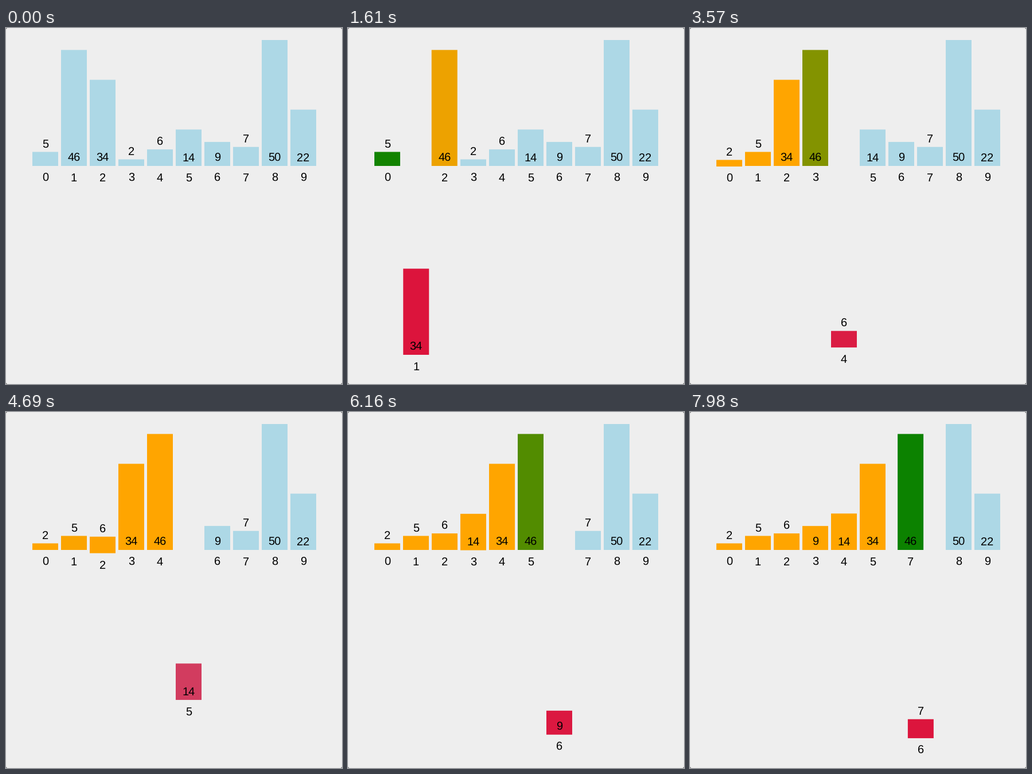
A matplotlib script that plays this animation: 586x622 px, repeating every 8000 ms.

```python
from itertools import islice

import matplotlib.pyplot as plt
import numpy as np
from matplotlib.animation import FuncAnimation
from matplotlib.colors import to_rgb
from matplotlib.patches import FancyBboxPatch, Rectangle

W, H, DPI = 586, 622, 100
LOOP_MS, INTERVAL, HOLD_MS = 8000, 20, 70
VALUES = [5, 46, 34, 2, 6, 14, 9, 7, 50, 22]

BAR_W, PITCH, LEFT, FLOOR, DROP = 45, 50, 46, 241, 330
GLIDE_MS = 250  # longer than a step, so each glide is cut short by the next

plt.rcParams["font.family"] = "Liberation Sans"
plt.rcParams["text.hinting"] = "none"


def bar_height(value):
    return 2.8 + 4.344 * value


def insertion_sort(values):
    """Yield (order, held, compared, sorted values) for every step."""
    order = list(values)
    yield order[:], None, None, set(order[:1])
    for i in range(1, len(order)):
        held = order[i]
        done = set(order[:i])
        yield order[:], held, None, done
        for j in range(i - 1, -1, -1):
            other = order[j]
            yield order[:], held, other, done
            if other < held:
                break
            order[j], order[j + 1] = held, other
            yield order[:], held, other, done
        yield order[:], None, None, done | {held}


def pose(order, held, compared, done):
    """One row per value: x, drop, red, green, blue."""
    rows = []
    for v in VALUES:
        if v == held:
            color = "crimson"
        elif v == compared:
            color = "green"
        else:
            color = "orange" if v in done else "lightblue"
        x = LEFT + PITCH * order.index(v)
        rows.append((x, DROP * (v == held), *to_rgb(color)))
    return np.array(rows, float)


def ease(t):
    t = min(max(t, 0), 1)
    return 4 * t**3 if t < 0.5 else 1 - 4 * (1 - t) ** 3


steps = list(islice(insertion_sort(VALUES), 43))
starts = np.interp(np.arange(1, len(steps) + 1),
                   [1, 5, 12, 19, 25, 33, 43],
                   [136, 872, 2163, 3446, 4533, 6018, 7872])


def state_at(ms):
    """Glide towards each step's pose from wherever the last one stopped."""
    now, order = pose(VALUES, None, None, set()), VALUES
    for n, (step, start) in enumerate(zip(steps, starts)):
        if start > ms:
            break
        end = min(ms, starts[n + 1]) if n + 1 < len(starts) else ms
        now = now + (pose(*step) - now) * ease((end - start) / GLIDE_MS)
        order = step[0]
    return now, order


fig = plt.figure(figsize=(W / DPI, H / DPI), dpi=DPI, facecolor="#606060")
ax = fig.add_axes([0, 0, 1, 1])
ax.set_xlim(0, W)
ax.set_ylim(H, 0)
ax.axis("off")
ax.add_patch(FancyBboxPatch((0, 0), W, H, lw=0, fc="#eeeeee",
                            boxstyle="round,pad=0,rounding_size=3"))


def label(text):
    return ax.text(0, 0, text, size=20 * 72 / DPI, color="black",
                   ha="center", va="baseline")


bars = [ax.add_patch(Rectangle((0, 0), BAR_W, bar_height(v), lw=0, snap=False))
        for v in VALUES]
value_labels = [label(str(v)) for v in VALUES]
index_labels = [label("") for _ in VALUES]


def update(frame):
    ms = (frame * INTERVAL + INTERVAL // 2) // HOLD_MS * HOLD_MS
    rows, order = state_at(ms)
    for k, v in enumerate(VALUES):
        x, drop, *rgb = rows[k]
        base, height = FLOOR + drop, bar_height(v)
        mid = x + BAR_W / 2
        bars[k].set_xy((x, base - height))
        bars[k].set_facecolor(np.clip(rgb, 0, 1))
        # Short bars carry their value on top.
        text_y = base - 8 if height > 40 else base - height - 7.5
        value_labels[k].set_position((mid, text_y))
        index_labels[k].set_position((mid, base + 27))
        index_labels[k].set_text(str(order.index(v)))
    return bars + value_labels + index_labels


anim = FuncAnimation(fig, update, frames=LOOP_MS // INTERVAL,
                     interval=INTERVAL, repeat=True, repeat_delay=0)
plt.show()
```
